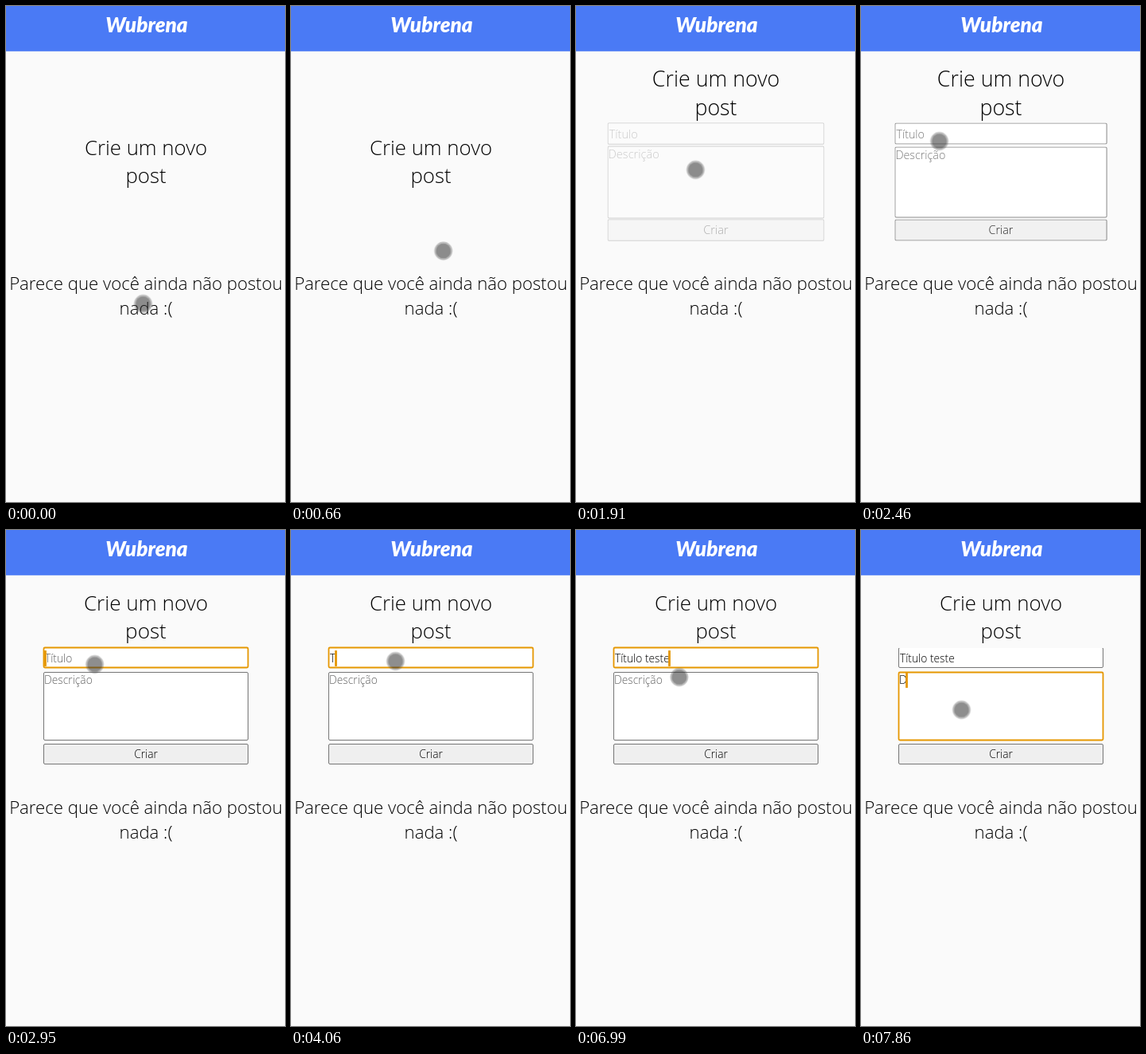
These frames come from a looping animation (351 by 622 pixels, 8 s). An HTML page:

```html
<!DOCTYPE html>
<html lang="pt">
<head>
<meta charset="utf-8">
<title>Wubrena</title>
<style>
  html, body { margin: 0; width: 100%; height: 100%; overflow: hidden; background: #fafafa; }
  svg { display: block; }
  text { font-family: "Open Sans", sans-serif; font-weight: 300; white-space: pre; }
  .mid { text-anchor: middle; }
  .brand { font: italic 900 26px Lato, sans-serif; fill: #fff; }
  .heading { font-size: 25.8px; }
  .empty { font-size: 22.2px; }
  .field text { font-size: 13.8px; }
  .field rect { fill: #fff; stroke: #767676; }
  .field.focus rect { stroke: #e59700; stroke-width: 1.8; }
  .field .button { fill: #efefef; }
  .field .caret { fill: #000; stroke: none; }
  .hint { fill: #606060; }

  .heading, .field { transform-box: fill-box; transform-origin: center; }
  .heading { animation: rise 8s linear infinite; }
  .field { animation: settle 8s linear infinite, fade 8s linear infinite; }
  .pointer { animation: roam 8s linear infinite; }

  @keyframes rise {
    0% { transform: translateY(86px); }
    16.125% { transform: translateY(86px); animation-timing-function: ease-in-out; }
    21.875%, 33.75% { transform: translateY(0) scale(1.04); }
    36.875% { transform: translateY(0) scale(1.013); }
    40%, 100% { transform: none; }
  }
  @keyframes settle {
    0%, 20% { transform: scale(1.07); }
    23.875% { transform: scale(1.058); }
    30.75% { transform: scale(1.036); }
    35.125%, 100% { transform: scale(1); }
  }
  @keyframes fade {
    0%, 20% { opacity: 0; }
    32.8%, 100% { opacity: 1; }
  }
  @keyframes roam {
    0%, .875% { transform: translate(172.5px, 373.5px); }
    2.25%, 4.75% { transform: translate(187px, 352px); }
    10% { transform: translate(194px, 285px); }
    14.375% { transform: translate(154px, 199px); }
    15.25%, 16.125% { transform: translate(164.5px, 189.5px); }
    23.875% { transform: translate(150.5px, 205.5px); }
    30.75% { transform: translate(98.5px, 169.5px); }
    36.875% { transform: translate(111.5px, 168.5px); }
    40.625%, 85.625% { transform: translate(131.5px, 164.5px); }
    91%, 100% { transform: translate(126.5px, 225.5px); }
  }
</style>
</head>
<body>
<svg width="351" height="622" viewBox="0 0 351 622">
  <rect width="351" height="622" fill="#fafafa"/>
  <rect width="351" height="56.8" fill="#4a7af5"/>
  <text class="brand mid" x="177" y="33">Wubrena</text>

  <g class="heading mid">
    <text x="176" y="101">Crie um novo</text>
    <text x="176" y="136">post</text>
  </g>

  <g class="empty mid">
    <text x="176" y="356">Parece que você ainda não postou</text>
    <text x="176" y="387">nada :(</text>
  </g>

  <g class="field" id="title">
    <rect x="47.5" y="147.5" width="257" height="25" rx="1.5"/>
    <path class="edge" d="M47 147.5H305" stroke="#fafafa" visibility="hidden"/>
    <text class="hint" x="49" y="166">Título</text>
    <text class="value" x="49" y="166"></text>
    <rect class="caret" y="152" width="1" height="18"/>
  </g>
  <g class="field" id="about">
    <rect x="47.5" y="178.5" width="257" height="85" rx="1.5"/>
    <text class="hint" x="48" y="193">Descrição</text>
    <text class="value" x="48" y="193"></text>
    <rect class="caret" y="179" width="1" height="18"/>
  </g>
  <g class="field">
    <rect class="button" x="47.5" y="268.5" width="257" height="25" rx="1.5"/>
    <text class="mid" x="176" y="286">Criar</text>
  </g>

  <g class="pointer">
    <circle r="9.5" fill="rgba(50,50,50,.55)"/>
    <circle r="10.4" fill="none" stroke="rgba(90,90,90,.4)" stroke-width="2"/>
  </g>
</svg>
<script>
  const LOOP = 8000;
  const FOCUS_TITLE = 2880, FOCUS_ABOUT = 7320;
  // Time at which each character is typed
  const titleKeys = [3980, 4460, 4650, 4850, 5050, 5180, 5380, 5710, 5840, 6040, 6170, 6300];
  const aboutKeys = [7790];

  function makeField(id, x, full, keys) {
    const root = document.getElementById(id);
    const part = name => root.querySelector('.' + name);
    const hint = part('hint'), value = part('value'), caret = part('caret');
    const show = (el, on) => el.setAttribute('visibility', on ? 'visible' : 'hidden');
    return (time, focused, caretOn) => {
      const typed = full.slice(0, keys.filter(k => k <= time).length);
      if (value.textContent !== typed) value.textContent = typed;
      root.classList.toggle('focus', focused);
      show(hint, !typed);
      show(caret, focused && caretOn);
      const width = typed ? value.getComputedTextLength() : 0;
      caret.setAttribute('x', Math.round(x + width - .3));
    };
  }

  const drawTitle = makeField('title', 49, 'Título teste', titleKeys);
  const drawAbout = makeField('about', 48, 'D', aboutKeys);
  const edge = document.querySelector('.edge');
  let start;

  function draw(now) {
    start ??= now;
    const time = (now - start) % LOOP;
    const inAbout = time >= FOCUS_ABOUT;
    const blink = time < 3250 || time >= 3710;
    drawTitle(time, time >= FOCUS_TITLE && !inAbout, blink);
    drawAbout(time, inAbout, true);
    edge.setAttribute('visibility', inAbout ? 'visible' : 'hidden');
    requestAnimationFrame(draw);
  }
  requestAnimationFrame(draw);
</script>
</body>
</html>
```
